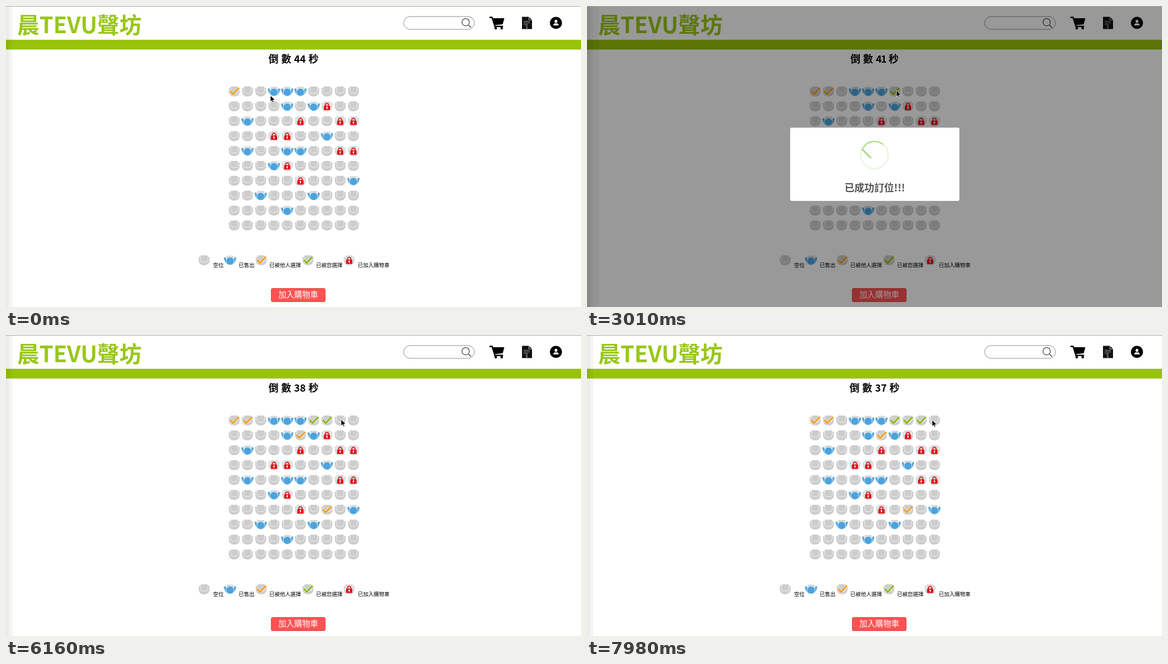
Recreate the animation shown at these times as an HTML page. Size 1033 px wide and 542 px high, loop 8 s.

```html
<!DOCTYPE html>
<html lang="zh-Hant">
<head>
<meta charset="utf-8">
<title>座位預訂</title>
<style>
html, body { margin: 0; width: 100%; height: 100%; overflow: hidden; background: #fff; }
body { position: relative; font-family: "Noto Sans CJK TC", "Noto Sans CJK", "Noto Sans CJK JP", "Noto Sans", sans-serif; }
svg { position: absolute; left: 0; top: 0; display: block; }
svg text { font-family: inherit; }
#shade { position: absolute; left: 0; top: 1px; width: 1033px; height: 541px; background: linear-gradient(90deg, rgba(0,0,0,.42) 21px, rgba(0,0,0,.4) 21px); }
.modal { position: absolute; left: 365px; width: 304px; font-size: 9.5px; background: #fff; border-radius: .3125em; }
#info { top: 202.7px; height: 164.6px; }
#done { top: 219px; height: 132px; }
#shade, .modal { visibility: hidden; }
#shade { animation: dim 70ms linear both, fade 100ms linear forwards; }
.modal { animation: show 300ms both, hide 150ms forwards; }

.title { position: absolute; left: 0; width: 100%; text-align: center; font-size: 1.875em; line-height: 28px; font-weight: 700; color: #545454; white-space: nowrap; }
#info .title { top: 93.5px; }
#done .title { top: 93px; }
.icon { position: absolute; box-sizing: content-box; left: calc(50% - 2.75em); top: 2.5em; width: 5em; height: 5em; border: .25em solid #a5dc86; border-radius: 50%; }
.icon i { position: absolute; }
#info .icon { border-color: #98d8f2; color: #4fb6e6; }
#info .icon span { position: absolute; left: 0; width: 100%; top: 0; text-align: center; font: 3.75em/1.333 "Noto Sans", "Open Sans", sans-serif; }
.loader { position: absolute; box-sizing: border-box; left: calc(50% - 1.1em); top: 131.5px; width: 2.2em; height: 2.2em; border: .25em solid; border-color: #2474a8 transparent; border-radius: 50%; animation: spin 1.5s linear infinite; }

.left, .right { width: 3.75em; height: 7.5em; background: #fff; transform: rotate(-45deg); }
.left { top: -.4375em; left: -2.0635em; transform-origin: 3.75em 3.75em; border-radius: 7.5em 0 0 7.5em; }
.right { top: -.6875em; left: 1.875em; transform-origin: 0 3.75em; border-radius: 0 7.5em 7.5em 0; animation: sweep 4.25s ease-in both; }
.ring { left: -.25em; top: -.25em; width: 5em; height: 5em; border: .25em solid rgba(165,220,134,.3); border-radius: 50%; }
.fix { top: .5em; left: 1.625em; width: .4375em; height: 5.625em; background: #fff; transform: rotate(-45deg); }
.tip, .long { height: .3125em; border-radius: .125em; background: #a5dc86; }
.tip { transform: rotate(45deg); animation: tip 750ms both; }
.long { transform: rotate(-45deg); animation: long 750ms both; }

/* every animation is paused and placed by --t, the ms since its owner opened */
#shade, .modal, .modal * { animation-play-state: paused !important; animation-delay: calc(var(--t) * -1ms) !important; }
#shade, div.modal { animation-delay: calc(var(--t) * -1ms), calc((var(--life) - var(--t)) * 1ms) !important; }

@keyframes dim { 0% { opacity: 0 } 25% { opacity: .56 } 47% { opacity: .8 } 100% { opacity: 1 } }
@keyframes fade { from { opacity: 1 } to { opacity: 0 } }
@keyframes show { 0% { transform: scale(.7) } 45% { transform: scale(1.05) } 80% { transform: scale(.95) } 100% { transform: scale(1) } }
@keyframes hide { from { transform: scale(1); opacity: 1 } to { transform: scale(.5); opacity: 0 } }
@keyframes spin { to { transform: rotate(360deg) } }
@keyframes sweep { 0%, 5% { transform: rotate(-45deg) } 12%, 100% { transform: rotate(-405deg) } }
@keyframes tip {
  0%, 54% { top: 1.1875em; left: .0625em; width: 0 }
  70% { top: 2.1875em; left: -.375em; width: 3.125em }
  84% { top: 3em; left: 1.3125em; width: 1.0625em }
  100% { top: 2.8125em; left: .8125em; width: 1.5625em }
}
@keyframes long {
  0%, 65% { top: 3.375em; right: 2.875em; width: 0 }
  84% { top: 2.1875em; right: 0; width: 3.4375em }
  100% { top: 2.375em; right: .5em; width: 2.9375em }
}
#count { position: absolute; left: 0; top: 80.3px; width: 1033px; text-align: center; font-size: 17.8px; line-height: 28px; font-weight: 700; word-spacing: 1px; color: #000; white-space: pre; }
#count .one { margin: 0 -1.5px; }
</style>
</head>
<body>
<svg width="1033" height="542" viewBox="0 0 1033 542">
  <defs>
    <g id="free">
      <path d="M-9.7-5.5Q-9.7-6.5-8.7-6.5H-6.7V-7.3Q-6.7-9-5-9H5Q6.7-9 6.7-7.3V-6.5H8.7Q9.7-6.5 9.7-5.5V1C9.2 6 5 9 0 9S-9.2 6-9.7 1Z" fill="#cdcdcd"/>
      <path d="M-6.7-7V-.5Q-6.5 3-3 3H3Q6.5 3 6.7-.5V-7" fill="none" stroke="#f4f4f4" stroke-width=".9"/>
    </g>
    <g id="sold">
      <path d="M-6.5-4V-6.5Q-6.5-8.5-4.5-8.5H4.5Q6.5-8.5 6.5-6.5V-4Z" fill="#d8d8d8"/>
      <path d="M-11.3-4.6Q-9.8-6-7.6-5.4L-5 4-3 8Q-9.5 5-11.3-4.6ZM11.3-4.6Q9.8-6 7.6-5.4L5 4 3 8Q9.5 5 11.3-4.6Z" fill="#5aa9de"/>
      <circle cy="1.3" r="7" fill="#4ca3dd" stroke="#e4eff7" stroke-width=".8"/>
    </g>
    <path id="tick" d="M-7.2-1-2.2 4.8 8.2-6.4" fill="none"/>
    <g id="other"><use href="#free"/><use href="#tick" stroke="#e6e6e6" stroke-width="4.8"/><use href="#tick" stroke="#f7a01c" stroke-width="3"/></g>
    <g id="mine"><use href="#free"/><use href="#tick" stroke="#e6e6e6" stroke-width="4.8"/><use href="#tick" stroke="#8dba0e" stroke-width="3"/></g>
    <g id="lock">
      <use href="#free" opacity=".75"/>
      <path d="M-3-.5V-2.5A3 3 0 0 1 3-2.5V-.5" fill="none" stroke="#e01018" stroke-width="1.7"/>
      <rect x="-5.6" y="-1.2" width="11.2" height="7.8" rx=".8" fill="#e01018"/>
      <path d="M-1.2 1.5A1.2 1.2 0 1 1 1.2 1.5L.7 4.6H-.7Z" fill="#fff"/>
    </g>
  </defs>
  <rect width="1033" height="542" fill="#fff"/>
  <rect y="60.8" width="1033" height="17.6" fill="#99c20a"/>
  <text x="20" y="49" font-size="40" font-weight="700" fill="#99c71a">晨TEVU聲坊</text>
  <rect width="5" height="542" opacity=".08"/>
  <rect x="5" width="6" height="542" opacity=".045"/>

  <rect x="714.5" y="19" width="127" height="23" rx="11.5" fill="#fff" stroke="#8c8c8c"/>
  <path d="M831 34.5 835.3 38.8" stroke="#444" stroke-width="1.6"/>
  <circle cx="825.8" cy="29.2" r="6.6" fill="none" stroke="#444" stroke-width="1.3"/>

  <path d="M868.5 20.5H873.2L878.4 36.8H893" fill="none" stroke="#000" stroke-width="2.4"/>
  <path d="M873.5 22H895.3L892.3 33 877.5 34.5Z"/>
  <circle cx="879.8" cy="40" r="2.3"/><circle cx="890.5" cy="40" r="2.3"/>

  <path d="M927 19.5H939.5L945 25V41.5H927Z" fill="#111"/>
  <path d="M939.5 19.5V25H945" fill="none" stroke="#fff" stroke-width=".8"/>
  <path d="M930 27.5H941M930 30.3H941M930 33.1H938" stroke="#bbb" stroke-width=".8"/>
  <text x="935.5" y="39.5" font-size="7" fill="#fff" text-anchor="middle">$</text>

  <circle cx="988" cy="30.4" r="10.8"/>
  <ellipse cx="988" cy="27.6" rx="2.5" ry="2.9" fill="#fff"/>
  <path d="M983.3 35V33.4Q983.8 31.6 986.3 31L988 31.8 989.7 31Q992.2 31.6 992.7 33.4V35Z" fill="#fff"/>

  <g id="seats"></g>
  <g id="legend" font-size="9.5" font-weight="500"></g>
  <rect x="476.5" y="508.5" width="97" height="24" rx="2.5" fill="#ff5252" stroke="#dc4a4a"/>
  <text x="525" y="525.3" font-size="14.3" fill="#fff" text-anchor="middle">加入購物車</text>
</svg>
<div id="count"></div>
<div id="shade"></div>
<div id="info" class="modal">
  <div class="icon"><span>i</span></div>
  <div class="title">座位預訂中...</div>
  <div class="loader"></div>
</div>
<div id="done" class="modal">
  <div class="icon"><i class="left"></i><i class="right"></i><i class="fix"></i><i class="ring"></i><i class="tip"></i><i class="long"></i></div>
  <div class="title">已成功訂位!!!</div>
</div>
<svg width="1033" height="542" viewBox="0 0 1033 542">
  <rect width="1033" height="1" fill="#a8a8a8"/>
  <path id="cursor" d="M0 0V11.6L2.7 9.1 4.5 13 6.4 12.2 4.6 8.4H8.3Z" stroke="#fff" stroke-width=".8"/>
</svg>
<script>
const LOOP = 8000, STEP = 70;
const $ = id => document.getElementById(id);
const NS = 'http://www.w3.org/2000/svg';

function add(parent, tag, attrs, text) {
  const el = document.createElementNS(NS, tag);
  for (const k in attrs) el.setAttribute(k, attrs[k]);
  if (text) el.textContent = text;
  parent.appendChild(el);
  return el;
}

const KIND = { '.': 'free', s: 'sold', o: 'other', m: 'mine', L: 'lock' };
const PLAN = 'o..sss....' + '....s.sL..' + '.s...L..LL' + '...LL..s..' + '.s..ss..LL' +
  '...sL.....' + '.....L...s' + '..s...s...' + '....s.....' + '..........';

const seats = [...PLAN].map((k, i) => add($('seats'), 'use', {
  transform: `translate(${410 + 23.8 * (i % 10)} ${154 + 26.8 * Math.floor(i / 10)})`
}));

[['free', 356, 372, '空位'], ['sold', 402.5, 418, '已售出'], ['other', 458.5, 473, '已被他人選擇'],
 ['mine', 542.5, 557, '已被您選擇'], ['lock', 616.5, 632, '已加入購物車']].forEach(([kind, x, tx, label]) => {
  add($('legend'), 'use', { href: '#' + kind, transform: `translate(${x} 458)` });
  add($('legend'), 'text', { x: tx, y: 469.8 }, label);
});

// booking rounds: info opens, success opens, success starts to close
const ROUNDS = [[2292, 2545, 3450], [4376, 4635, 5540], [6433, 6694, 7600]];
// seat changes: time, seat index, new kind
const CHANGES = [[1470, 1, 'o'], [3430, 15, 'o'], [5460, 67, 'o']]
  .concat(ROUNDS.map((r, i) => [r[1] + 40, 6 + i, 'm']));

const PATH = [[0, 475, 161], [210, 541, 163], [280, 541, 163], [630, 566, 158], [980, 562, 164],
  [1050, 562, 164], [1120, 541, 138], [1190, 556, 152], [3360, 556, 152], [3780, 574, 152],
  [5390, 574, 152], [5810, 602, 152], [7560, 602, 152], [7980, 620, 153]];

function pointer(t) {
  let i = 1;
  while (i < PATH.length - 1 && PATH[i][0] < t) i++;
  const [t0, x0, y0] = PATH[i - 1], [t1, x1, y1] = PATH[i];
  let p = Math.min(1, (t - t0) / (t1 - t0));
  p = p * p * (3 - 2 * p);
  return [x0 + (x1 - x0) * p, y0 + (y1 - y0) * p];
}

function place(el, t, from, to, closeAt) {
  el.style.visibility = t >= from && t < to ? 'visible' : 'hidden';
  el.style.setProperty('--t', Math.max(0, t - from));
  el.style.setProperty('--life', closeAt - from);
}

function draw(t) {
  seats.forEach((el, i) => {
    let k = PLAN[i];
    for (const [at, n, kind] of CHANGES) if (n === i && t >= at) k = kind;
    const ref = '#' + KIND[k];
    if (el.getAttribute('href') !== ref) el.setAttribute('href', ref);
  });

  const left = 44 - Math.floor((t + 140) / 1050);
  const html = `倒 數 ${String(left).replace('1', '<span class="one">1</span>')} 秒`;
  if ($('count').innerHTML !== html) $('count').innerHTML = html;

  const [open, ok, close] = ROUNDS.find(r => t < r[2] + 150) || ROUNDS[2];
  place($('shade'), t, open, close + 150, close);
  place($('info'), t, open, ok, LOOP);
  place($('done'), t, ok, close + 150, close);

  const [x, y] = pointer(t);
  $('cursor').setAttribute('transform', `translate(${x} ${y})`);
}

const start = performance.now();
function tick() {
  const t = (performance.now() - start) % LOOP;
  draw(Math.floor(t / STEP) * STEP);
  requestAnimationFrame(tick);
}
tick();
</script>
</body>
</html>
```
